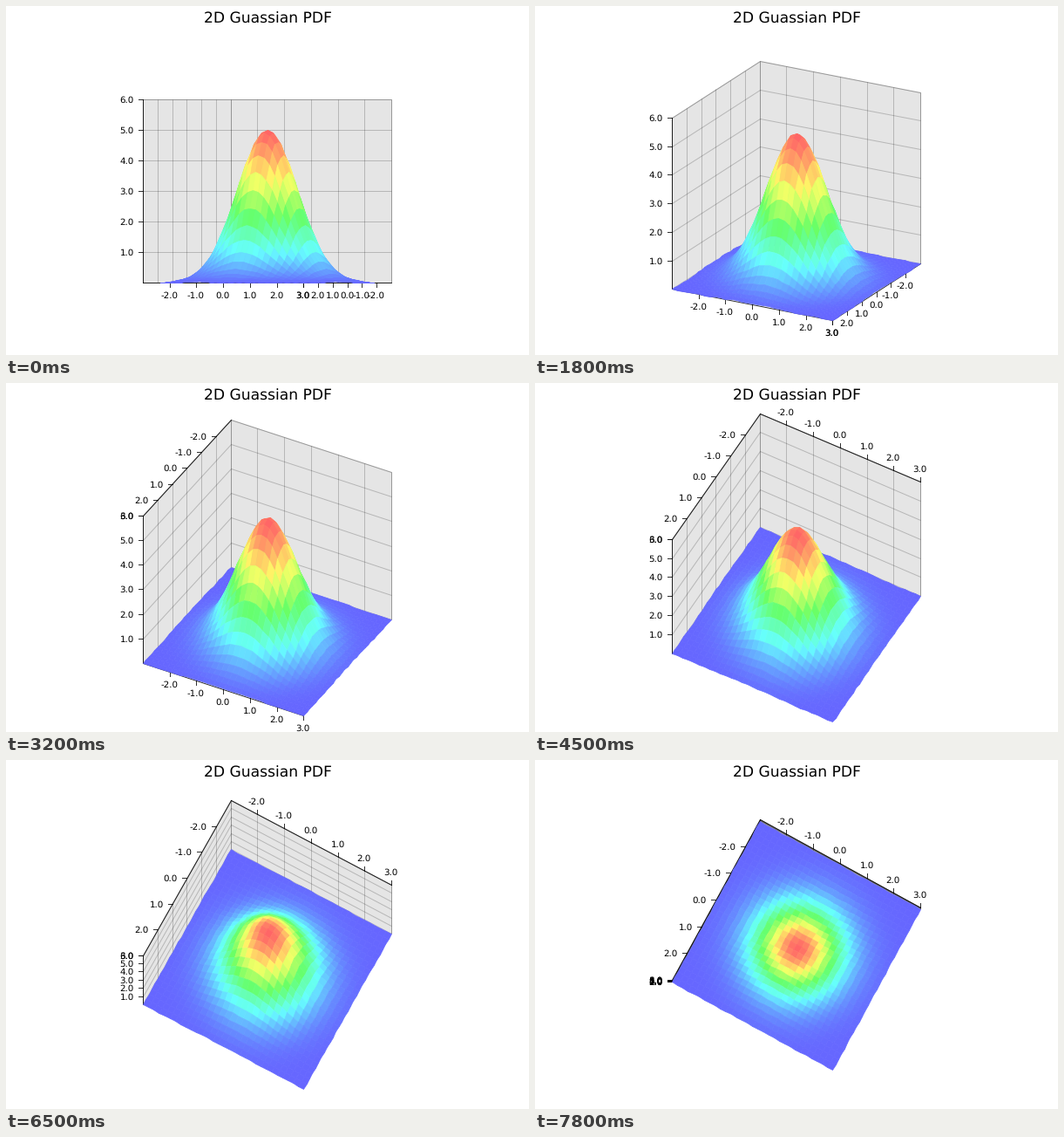
These frames come from a looping animation (600 by 400 pixels, 8000 ms). A matplotlib script:

```python
import colorsys

import matplotlib.pyplot as plt
import numpy as np
from matplotlib.animation import FuncAnimation
from matplotlib.collections import LineCollection, PolyCollection

W, H, DPI = 600, 400, 100
PX = 72 / DPI
FRAMES, LAST = 80, 78
CX, CY, UNIT = 300, 212, 35
YAW = 0.5
COS, SIN = np.cos(YAW), np.sin(YAW)
EM = 1 / 1.164  # line height to em size
LABEL, TITLE = 12 * EM, 20 * EM

plt.rcParams.update({"font.family": "DejaVu Sans", "text.hinting": "none"})

fig = plt.figure(figsize=(W / DPI, H / DPI), dpi=DPI, facecolor="white")
ax = fig.add_axes([0, 0, 1, 1])
ax.set_xlim(0, W)
ax.set_ylim(H, 0)
ax.axis("off")


def project(x, y, z, pitch):
    """Orthographic view of (x, y, z), snapped to pixel centres."""
    sx = CX + UNIT * (COS * x - SIN * y)
    sy = CY + UNIT * ((SIN * x + COS * y) * np.sin(pitch)
                      - (z - 3) * np.cos(pitch))
    sx, sy = np.broadcast_arrays(sx, sy)
    return np.floor(np.stack([sx, sy], -1) + 1e-9) + 0.5


def path(points, pitch):
    return project(*np.array(points, float).T, pitch)


# Surface, cells ordered from far to near; heights fall on a fine grid
side = np.arange(-15, 16) / 5
gx, gy = np.meshgrid(side, side, indexing="ij")
pdf = 5 * np.exp(-(gx ** 2 + gy ** 2) / 2)
gz = np.floor(pdf * 50) / 50
hues = 2 / 3 * (1 - pdf[:-1, :-1].ravel() / 5)
cell_colors = [colorsys.hls_to_rgb(h, 0.7, 1) for h in hues]

# Back walls with their grid lines
WALLS = [[(-3, 3, 0), (-3, -3, 0), (-3, -3, 6), (-3, 3, 6)],
         [(-3, -3, 0), (3, -3, 0), (3, -3, 6), (-3, -3, 6)]]
FLAT = range(-2, 4)
UP = range(1, 7)
GRID = [w + w[:1] for w in WALLS]
GRID += [[(-3, v, 0), (-3, v, 6)] for v in FLAT]
GRID += [[(v, -3, 0), (v, -3, 6)] for v in FLAT]
for v in UP:
    GRID += [[(-3, -3, v), (-3, 3, v)], [(-3, -3, v), (3, -3, v)]]

walls = PolyCollection([], facecolors="#e5e5e5", linewidths=0, zorder=1)
grid = LineCollection([], colors=[(0, 0, 0, 0.2)], linewidths=PX, zorder=2)
axes = LineCollection([], colors=[(0, 0, 0, 0.8)], linewidths=PX, zorder=3,
                      capstyle="projecting")
surface = PolyCollection([], facecolors=cell_colors, edgecolors="face",
                         linewidths=0.6 * PX, zorder=5)
for part in (walls, grid, axes, surface):
    part.set_snap(False)
    ax.add_collection(part, autolim=False)

labels = [ax.text(0, 0, "", fontsize=LABEL * PX, color="black",
                  va="baseline", zorder=4) for _ in range(18)]
ax.text(CX - 73.4, 20, "2D Guassian PDF", fontsize=TITLE * PX,
        color="black", va="baseline")

# Tick vector, label offset and share of the label left of that point
BELOW = (0, 5), (0, 18), 0.5
ABOVE = (0, -5), (0, -11), 0.5
LEFT = (-5, 0), (-10, 4), 1


def axis_layout(pitch):
    """Edge function, tick values and label side of the three axes."""
    tilt = np.tan(pitch)
    if tilt > COS - 0.001:
        x_axis = (lambda v: (v, -3, 6)), FLAT, ABOVE
    else:
        x_axis = (lambda v: (v, 3, 0)), FLAT, BELOW
    if tilt > SIN:
        y_axis = (lambda v: (-3, v, 6)), FLAT, LEFT
    else:
        y_axis = (lambda v: (3, v, 0)), FLAT, BELOW
    z_axis = (lambda v: (-3, 3, v)), UP, LEFT
    return x_axis, y_axis, z_axis


def cells(pitch):
    p = project(gx, gy, gz, pitch)
    quads = np.stack([p[:-1, :-1], p[1:, :-1], p[1:, 1:], p[:-1, 1:]], 2)
    quads = quads.reshape(-1, 4, 2)
    flat = np.ptp(quads[..., 1], axis=1) == 0
    quads[flat] = -10  # edge-on cells have no area
    return quads


def place(label, v, point, share):
    """Write a tick value with its pen origin on a whole pixel."""
    width = int(LABEL * (1.59 + 0.361 * (v < 0)))
    x, y = np.floor(point)
    label.set_text(f"{v:.1f}")
    label.set_position((x - int(width * share) - 0.4, y))


def update(i):
    pitch = 0.02 * min(i, LAST)
    walls.set_verts([path(w, pitch) for w in WALLS])
    grid.set_segments([path(g, pitch) for g in GRID])
    surface.set_verts(cells(pitch))

    lines = []
    free = iter(labels)
    for edge, values, (tick, shift, share) in axis_layout(pitch):
        lines.append(path([edge(values[0] - 1), edge(values[-1])], pitch))
        for v in values:
            p = path([edge(v)], pitch)[0]
            lines.append(np.array([p, p + tick]))
            place(next(free), v, p + shift, share)
    axes.set_segments(lines)
    return [walls, grid, axes, surface, *labels]


anim = FuncAnimation(fig, update, frames=FRAMES, interval=100,
                     repeat=True, repeat_delay=0, blit=False)
plt.show()
```
